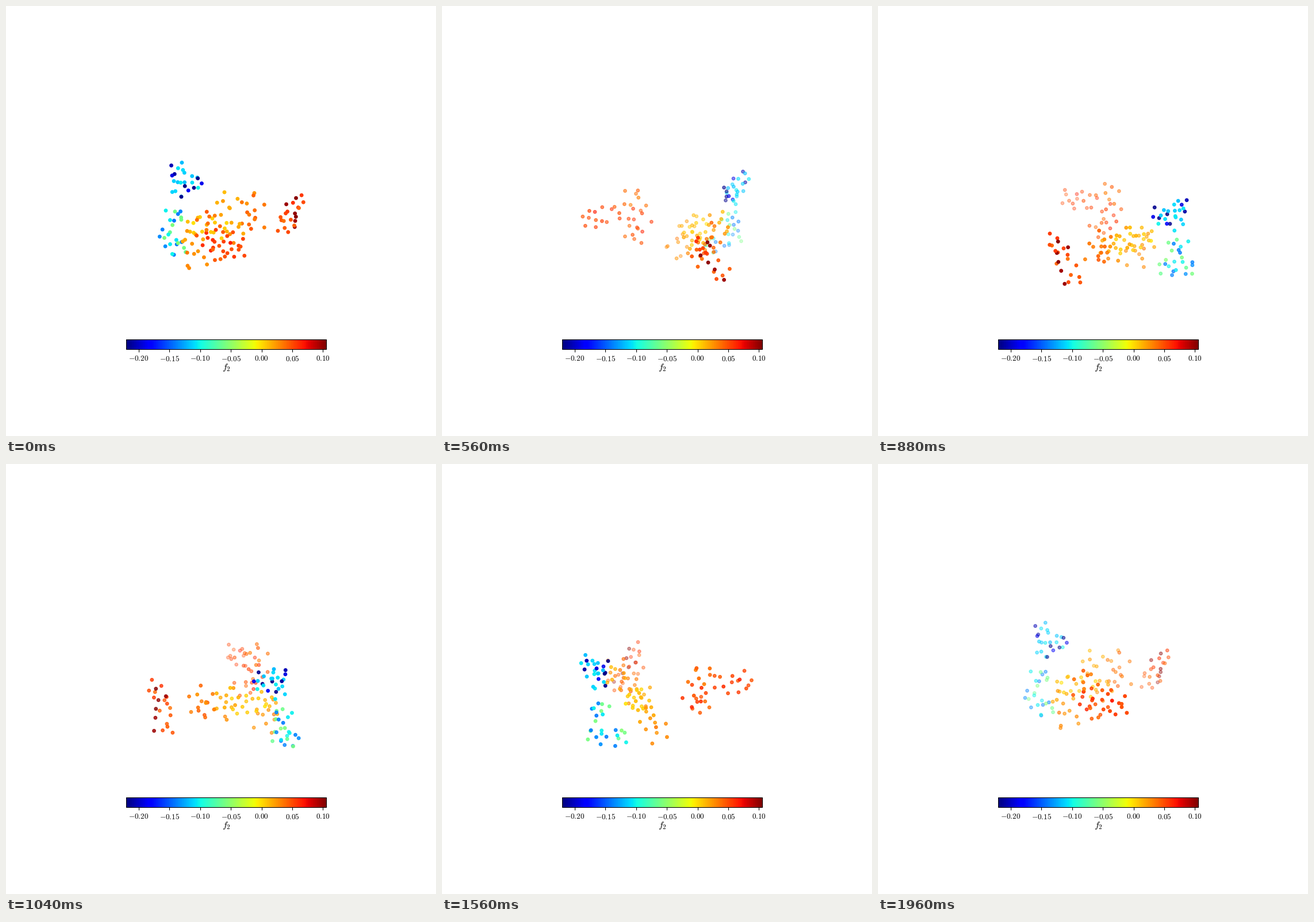
A matplotlib script for the animation above (2000 ms loop, 748 px wide and 748 px high).

```python
import numpy as np
import matplotlib.pyplot as plt
from matplotlib.animation import FuncAnimation
from matplotlib.cm import ScalarMappable
from matplotlib.colors import Normalize

SIZE = 748
FRAMES = 50
CENTER = 391, 370
CAMERA = 3110                  # eye distance in pixels
ELEV = np.radians(20)
PT = 0.72                      # points per pixel at 100 dpi

plt.rcParams["mathtext.fontset"] = "cm"
rng = np.random.default_rng(11)


def blob(n, radius, center, values):
    """n dots spread evenly around a center (right, back, up), values in turn."""
    i = np.arange(n)
    h = 1 - (2 * i + 1) / n
    turn = i * np.pi * (3 - np.sqrt(5)) + rng.uniform(0, 2 * np.pi)
    ring = np.sqrt(1 - h * h)
    way = np.c_[ring * np.cos(turn), ring * np.sin(turn), h]
    spot = center + way * radius * rng.uniform(0.5, 1.1, (n, 1))
    return np.c_[spot, np.resize(values, n) + rng.normal(0, 0.005, n)]


crown = [(-93, 118, 48), (-92, 100, 18), (-64, 104, 32)]
left = [(-98, 98, -30), (-115, 102, -68), (-94, 66, -78)]
tip = [(118, 83, 0), (106, 80, -25), (100, 110, -54)]
body = [
    (-60, 45, -25, 0.002), (-22, 50, -35, 0.004), (-8, 86, -3, 0.018),
    (36, 96, -6, 0.032), (38, 78, -35, 0.038), (8, 50, -40, 0.022),
    (-70, 22, -42, 0.02), (-36, -65, 22, 0.035), (-40, -60, -15, 0.056),
    (-62, 5, -75, 0.027), (-20, -62, -40, 0.046), (10, -135, -5, 0.052),
    (-8, -100, 0, 0.05),
]
parts = [blob(8, 20, c, (-0.11, -0.212, -0.108, -0.11, -0.19)) for c in crown]
parts += [blob(8, 21, c, (-0.062, -0.14, -0.1)) for c in left]
parts += [blob(7, 20, c, (0.05, 0.1, 0.048)) for c in tip]
parts += [blob(7, 24, c, v) for *c, v in body]
X, Y, Z, value = np.vstack(parts).T

norm = Normalize(-0.2199, 0.1054)
colors = plt.cm.jet(norm(value))

fig = plt.figure(figsize=(SIZE / 100, SIZE / 100), dpi=100, facecolor="white")
ax = fig.add_axes([0, 0, 1, 1])
ax.set(xlim=(0, SIZE), ylim=(SIZE, 0))
ax.axis("off")
dots = ax.scatter(X, Y, s=(5.3 * PT) ** 2, linewidths=1.5 * PT)

cax = fig.add_axes([209.4 / SIZE, 1 - 597 / SIZE, 347.8 / SIZE, 17.4 / SIZE])
bar = fig.colorbar(ScalarMappable(norm, "jet"), cax=cax, orientation="horizontal")
ticks = np.arange(-4, 3) * 0.05
bar.set_ticks(ticks, labels=[f"${t:.2f}$" for t in ticks])
bar.outline.set_linewidth(1.07 * PT)
cax.tick_params(length=4.6 * PT, width=1.07 * PT, pad=5.2 * PT, labelsize=13.2 * PT)
ax.text(383.5, 633.5, "$f_2$", size=16 * PT, ha="center", va="baseline")


def update(i):
    a = 2 * np.pi * i / FRAMES
    right = X * np.cos(a) + Y * np.sin(a)
    back = Y * np.cos(a) - X * np.sin(a)
    up = Z * np.cos(ELEV) + back * np.sin(ELEV)
    depth = back * np.cos(ELEV) - Z * np.sin(ELEV)
    k = CAMERA / (CAMERA + depth)
    order = np.argsort(-depth)

    rgba = colors.copy()
    if i:                      # the opening pose is drawn without depth shading
        rgba[:, 3] = 1 - 0.7 * (depth - depth.min()) / np.ptp(depth)
    dots.set_offsets(np.c_[CENTER[0] + right * k, CENTER[1] - up * k][order])
    dots.set_facecolors(rgba[order])
    dots.set_edgecolors(rgba[order])
    return dots,


anim = FuncAnimation(fig, update, frames=FRAMES, interval=40, repeat=True, repeat_delay=0)
plt.show()
```
